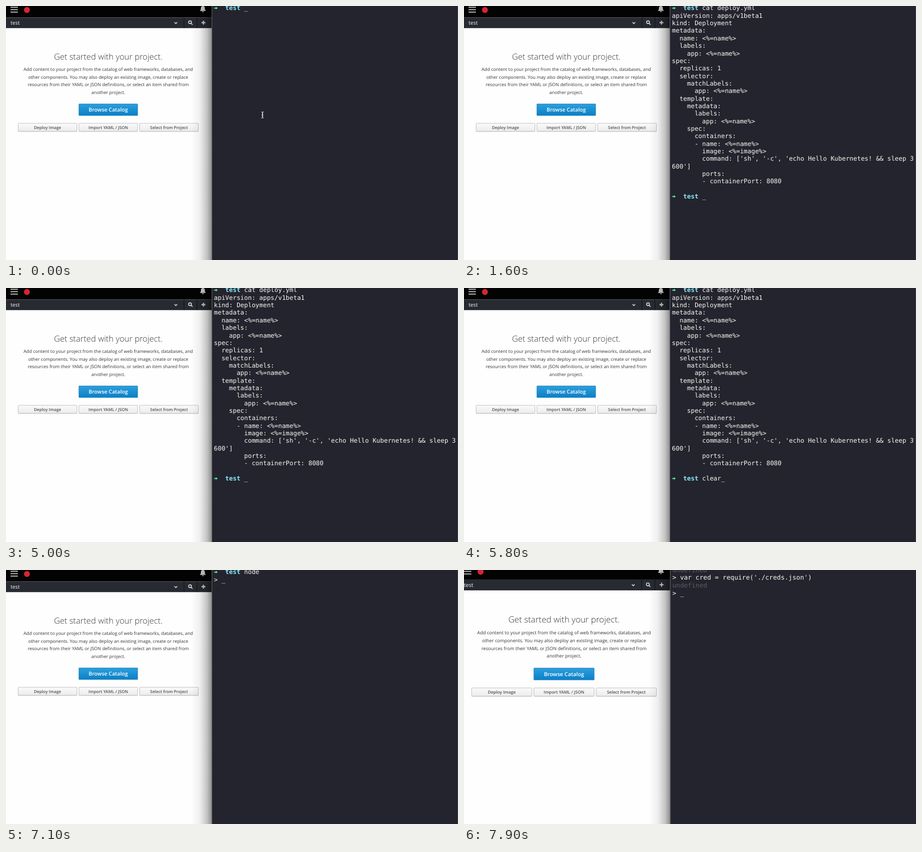
Animation, 800 px wide and 450 px high, one loop 8000 ms. Source, as an HTML page:

```html
<!DOCTYPE html>
<html lang="en">
<head>
<meta charset="utf-8">
<title>Terminal session</title>
<style>
html, body { margin: 0; width: 100%; height: 100%; overflow: hidden; background: #24242e; }
svg { display: block; width: 800px; height: 450px; }
text { white-space: pre; text-rendering: geometricPrecision; font-family: "Open Sans", sans-serif; }
.mid { text-anchor: middle; }
.copy { font-size: 8px; fill: #363636; }
.small { font-size: 7.33px; font-weight: 600; fill: #4d5258; }
#term text { font: 11.12px "DejaVu Sans Mono", monospace; fill: #f8f8f2; }
#term .dim { fill: #5a5a60; }
#term .dir { font-weight: bold; fill: #8be9fd; }
</style>
</head>
<body>
<svg viewBox="0 0 800 450">
  <defs>
    <linearGradient id="blue" x2="0" y2="1"><stop stop-color="#2d9fdc"/><stop offset="1" stop-color="#0a80c8"/></linearGradient>
    <linearGradient id="grey" x2="0" y2="1"><stop stop-color="#fafafa"/><stop offset="1" stop-color="#ececec"/></linearGradient>
    <linearGradient id="shade">
      <stop stop-opacity="0"/><stop offset=".4" stop-opacity=".06"/>
      <stop offset=".75" stop-opacity=".23"/><stop offset="1" stop-opacity=".46"/>
    </linearGradient>
  </defs>
  <g id="scene">
    <rect x="-20" y="-20" width="385" height="500" fill="#fefefe"/>
    <rect x="-20" y="-20" width="385" height="40.5" fill="#030303"/>
    <rect x="-20" y="20.5" width="385" height="18.7" fill="#272b31"/>
    <path d="M315 20.5v18.7M338 20.5v18.7" stroke="#101215"/>
    <path d="M8 2.2h13M8 6.5h13M8 10.8h13" stroke="#d6d6d6" stroke-width="1.5"/>
    <circle cx="37" cy="7" r="5.2" fill="#db2430"/>
    <path d="M348.500 0c2.600 0 3.600 2 3.600 4.500 0 2 .5 3 1.700 4.300h-10.600c1.200-1.300 1.700-2.300 1.700-4.300 0-2.500 1-4.500 3.600-4.500zM347 9.500h3a1.500 1.500 0 0 1-3 0z" fill="#d2d2d2"/>
    <text x="8" y="33.2" font-size="9.33" fill="#f2f2f2">test</text>
    <g fill="none" stroke="#dcdcdc" stroke-width="1.4">
      <path d="M298.200 28.800l2.400 2.400 2.400-2.400"/>
      <circle cx="325.700" cy="28.800" r="2.500"/>
      <path d="M327.600 30.700l2.600 2.600"/>
      <path d="M346 29.500h7M349.500 26v7" stroke-width="1.800"/>
    </g>

    <text class="mid" x="181" y="95.200" font-size="14.67" font-weight="300" fill="#333">Get started with your project.</text>
    <g class="mid copy">
      <text x="181" y="115.300">Add content to your project from the catalog of web frameworks, databases, and</text>
      <text x="181" y="128.700">other components. You may also deploy an existing image, create or replace</text>
      <text x="181" y="142.100">resources from their YAML or JSON definitions, or select an item shared from</text>
      <text x="181" y="155.500">another project.</text>
    </g>
    <rect x="129" y="173.500" width="104" height="20.500" rx=".6" fill="url(#blue)" stroke="#1b75ae" stroke-width=".7"/>
    <text class="mid" x="181" y="187.100" font-size="9.33" font-weight="600" fill="#fff">Browse Catalog</text>
    <g id="buttons"></g>

    <rect x="328" y="-20" width="37" height="500" fill="url(#shade)"/>
    <rect x="364.500" y="-20" width="460" height="500" fill="#24242e"/>
    <path d="M364.500 -20v500" stroke="#5d5d63"/>
    <path d="M799.600 0v450" stroke="#484852" stroke-width=".8"/>
    <g id="term"></g>
    <path id="beam" d="M451.800 187.500q2.200 0 2.200 1.500v8q0 1.500-2.200 1.500M456.200 187.500q-2.200 0-2.200 1.500v8q0 1.500 2.200 1.500M452.600 193.200h2.800" fill="none" stroke="#e4e4e8"/>
  </g>
</svg>
<script>
const LOOP = 8000, CUT = 7200;
const LEFT = 368, BASE = 7.4, PITCH = 13.35;
const $ = id => document.getElementById(id);
const esc = s => s.replace(/&/g, '&amp;').replace(/</g, '&lt;');

const manifest = `apiVersion: apps/v1beta1
kind: Deployment
metadata:
  name: <%=name%>
  labels:
    app: <%=name%>
spec:
  replicas: 1
  selector:
    matchLabels:
      app: <%=name%>
  template:
    metadata:
      labels:
        app: <%=name%>
    spec:
      containers:
      - name: <%=name%>
        image: <%=image%>
        command: ['sh', '-c', 'echo Hello Kubernetes! && sleep 3
600']
        ports:
        - containerPort: 8080
`.split('\n');

$('buttons').innerHTML = ['Deploy Image', 'Import YAML / JSON', 'Select from Project'].map((label, i) => {
  const x = 21.5 + 107.5 * i;
  return `<rect x="${x}" y="208.600" width="104" height="14.500" fill="#000" opacity=".13"/>
    <rect x="${x}" y="207.800" width="104" height="14.200" rx=".6" fill="url(#grey)" stroke="#b9b9b9" stroke-width=".8"/>
    <text class="mid small" x="${x + 52}" y="217.700">${label}</text>`;
}).join('');

// keys: [time, number of characters visible from then on]
function typed(text, keys, t) {
  const hit = keys.filter(k => t >= k[0]).pop();
  return text.slice(0, hit ? hit[1] : 0);
}

const cat = t => typed('cat deploy.yml ',
  [[100, 1], [500, 2], [600, 3], [800, 4], [900, 5], [1000, 6], [1100, 7], [1200, 15]], t);
const clear = t => typed('clear', [[5500, 1], [5600, 2], [5700, 4], [5800, 5]], t);
const node = t => typed('node', [[6200, 1], [6300, 2], [6400, 3], [6500, 4]], t);
const shell = s => '$' + s;

function screen(t) {
  const call = "> var cred = require('./creds.json')";
  if (t < 1500) return [shell(cat(t) + '_')];
  if (t < 6000) return [shell(cat(t)), ...manifest, shell(clear(t) + '_')];
  if (t < 6800) return [shell(node(t) + '_')];
  if (t < CUT) return [shell('node'), '> _'];
  if (t < 7500) return ['undefined', call + '_'];
  return ['undefined', call, 'undefined', '> _'];
}

function line(s, i) {
  const y = BASE + PITCH * i;
  if (s[0] !== '$')
    return `<text x="${LEFT}" y="${y}"${s === 'undefined' ? ' class="dim"' : ''}>${esc(s)}</text>`;
  return `<path d="M${LEFT + .3} ${y - 4.3}h3v-1.600l3.500 2.300-3.500 2.300v-1.600h-3z" fill="#5af29a"/>
    <text x="${LEFT}" y="${y}">   <tspan class="dir">test</tspan> ${esc(s.slice(1))}</text>`;
}

let shown = '';
function frame(now) {
  const t = now % LOOP;
  const html = screen(t).map(line).join('');
  if (html !== shown) $('term').innerHTML = shown = html;
  $('beam').style.display = t < 100 ? '' : 'none';
  $('scene').setAttribute('transform',
    t < CUT ? '' : 'translate(340 163) scale(1.025) translate(-340 -163)');
  requestAnimationFrame(frame);
}
const start = performance.now();
(function tick() {
  frame(0);
})();
</script>
</body>
</html>
```
